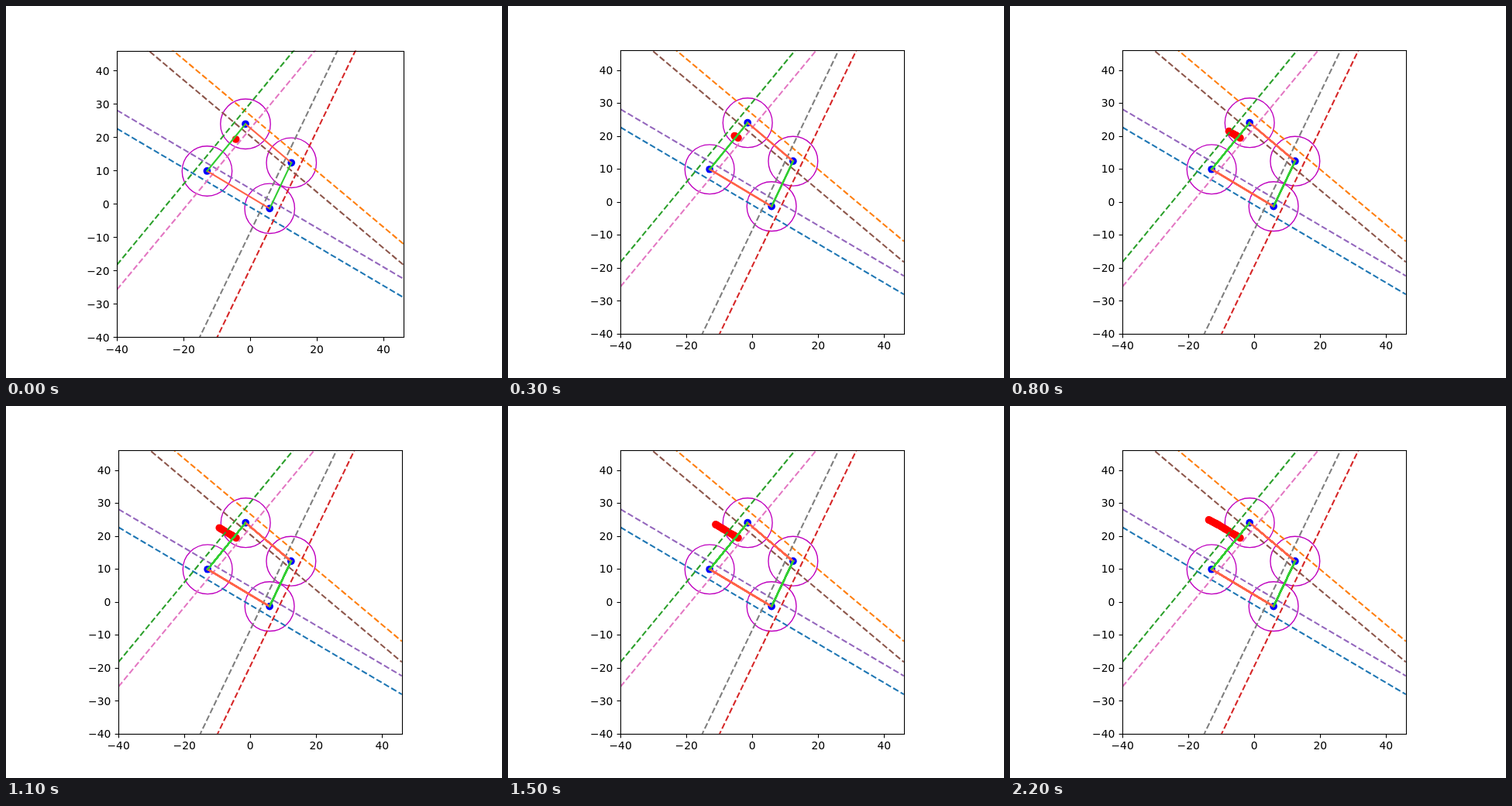
An HTML page with a canvas for the animation above (2300 ms loop, 640 by 480 pixels).

```html
<!DOCTYPE html>
<html>
<head>
<meta charset="utf-8">
<style>
html, body { margin: 0; width: 100%; height: 100%; overflow: hidden; background: #fff; }
canvas { display: block; }
</style>
</head>
<body>
<canvas id="stage" width="640" height="480"></canvas>
<script>
const ctx = document.getElementById('stage').getContext('2d');
const STEP = 100, STEPS = 23, PT = 100 / 72;
const MIN = -40, MAX = 46;
const ticks = [-40, -20, 0, 20, 40];
const yTicks = [-40, -30, -20, -10, 0, 10, 20, 30, 40];

// Dashed boundaries: colour and two points in data units
const bounds = [
  ['#1f77b4', -40, 22.6, 46, -28.1],
  ['#ff7f0e', -23.15, 46, 46, -12],
  ['#2ca02c', -40, -18.3, 13.05, 46],
  ['#d62728', -9.9, -40, 31.6, 46],
  ['#9467bd', -40, 28.1, 46, -22.5],
  ['#8c564b', -30.5, 46, 46, -18.3],
  ['#e377c2', -40, -25.75, 19.45, 46],
  ['#7f7f7f', -15.15, -40, 26.2, 46]
];
const A = [-1.42, 23.97], B = [-12.95, 9.85], C = [5.85, -1.4], D = [12.37, 12.33];
const edges = [['#ff6347', A, D], ['#ff6347', B, C], ['#32cd32', A, B], ['#32cd32', D, C]];

// Track of the red marker: step, x, y
const track = [
  [0, -4.3, 19.38], [1, -5.1, 19.8], [5, -5.7, 20.2], [8, -7.7, 21.4],
  [13, -10.5, 23.1], [18, -12.05, 23.95], [22, -13.8, 24.85]
];

function trackAt(step) {
  const i = Math.max(1, track.findIndex(p => p[0] >= step));
  const [s0, x0, y0] = track[i - 1], [s1, x1, y1] = track[i];
  const u = (step - s0) / (s1 - s0);
  return [x0 + (x1 - x0) * u, y0 + (y1 - y0) * u];
}

function draw(step) {
  // The figure becomes slightly shorter after the first step
  const height = step ? 475 : 480;
  const size = 0.77 * height, top = 0.12 * height, left = 328 - size / 2;
  const right = left + size, bottom = top + size, unit = size / (MAX - MIN);
  const X = x => left + (x - MIN) * unit;
  const Y = y => top + (MAX - y) * unit;
  const snap = v => Math.round(v) + 0.5;

  function line(x0, y0, x1, y1, color, width) {
    ctx.strokeStyle = color;
    ctx.lineWidth = width;
    ctx.beginPath();
    ctx.moveTo(x0, y0);
    ctx.lineTo(x1, y1);
    ctx.stroke();
  }
  function circle([x, y], r) {
    ctx.beginPath();
    ctx.arc(X(x), Y(y), r, 0, 2 * Math.PI);
  }
  function dot(p, color) {
    ctx.fillStyle = color;
    circle(p, 3.5 * PT);
    ctx.fill();
  }

  ctx.fillStyle = '#fff';
  ctx.fillRect(0, 0, 640, 480);

  ctx.save();
  ctx.beginPath();
  ctx.rect(left, top, size, size);
  ctx.clip();
  for (const p of [A, B, C, D]) {
    dot(p, '#00f');
    ctx.strokeStyle = '#bf00bf';
    ctx.lineWidth = PT;
    circle(p, 7.5 * unit);
    ctx.stroke();
  }
  for (let i = 0; i <= step; i++) dot(trackAt(i), '#f00');

  ctx.setLineDash([5.55 * PT, 2.4 * PT]);
  for (const [color, x0, y0, x1, y1] of bounds) {
    const slope = (y1 - y0) / (x1 - x0);
    const floor = MIN - (height + 1 - bottom) / unit;
    const start = slope > 0 ? Math.max(MIN, x0 + (floor - y0) / slope) : MIN;
    const at = x => Y(y0 + slope * (x - x0));
    line(X(start), at(start), X(MAX), at(MAX), color, 1.5 * PT);
  }
  ctx.setLineDash([]);

  // Every step strokes the edges again, which firms up their soft borders
  ctx.lineCap = 'square';
  for (let i = 0; i <= step; i++)
    for (const [color, p, q] of edges)
      line(X(p[0]), Y(p[1]), X(q[0]), Y(q[1]), color, 1.5 * PT);
  ctx.restore();

  const thin = 0.8 * PT, tick = 3.5 * PT;
  ctx.strokeStyle = '#000';
  ctx.lineWidth = thin;
  ctx.strokeRect(snap(left), snap(top), snap(right) - snap(left), snap(bottom) - snap(top));

  ctx.fillStyle = '#000';
  ctx.font = 10 * PT + 'px "DejaVu Sans", sans-serif';
  const label = v => String(v).replace('-', '\u2212');
  ctx.textAlign = 'center';
  for (const v of ticks) {
    const x = snap(X(v)), y = snap(bottom);
    line(x, y, x, y + tick, '#000', thin);
    ctx.fillText(label(v), X(v), Math.round(bottom + 20.3));
  }
  ctx.textAlign = 'right';
  for (const v of yTicks) {
    const x = snap(left), y = snap(Y(v));
    line(x, y, x - tick, y, '#000', thin);
    ctx.fillText(label(v), left - 2 * tick, Math.round(Y(v) + 5.3));
  }
}

let shown = -1;
const begin = performance.now();
function frame() {
  const step = Math.floor((performance.now() - begin) / STEP) % STEPS;
  if (step !== shown) draw(shown = step);
  requestAnimationFrame(frame);
}
frame();
</script>
</body>
</html>
```
